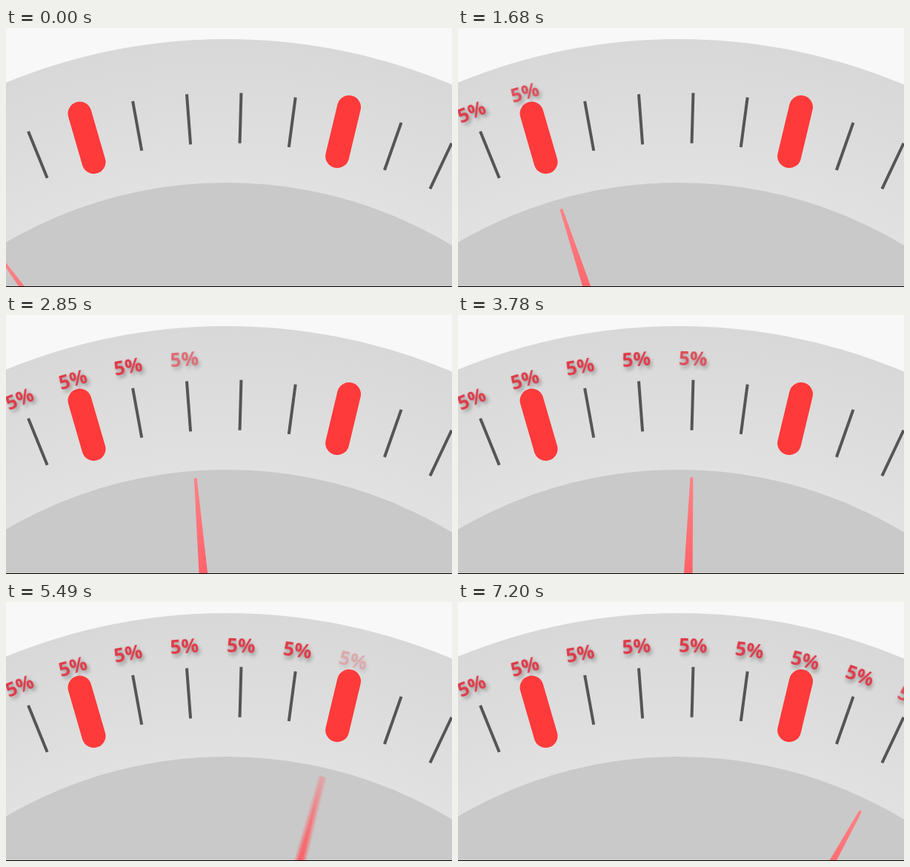
These frames come from a looping animation (602 px wide and 350 px high, 7590 ms). An HTML page with a canvas:

```html
<!DOCTYPE html>
<html lang="en">
<head>
<meta charset="utf-8">
<title>Dial</title>
<style>
  html, body { margin: 0; width: 100%; height: 100%; overflow: hidden; background: #f8f8f8; }
  svg, canvas { position: absolute; left: 0; top: 0; width: 602px; height: 350px; }
  text {
    font: 700 26px "Open Sans", "Noto Sans", sans-serif;
    text-anchor: middle;
    fill: #de3a48;
    filter: drop-shadow(2px 4px 2.5px rgba(0, 0, 0, .3));
  }
</style>
</head>
<body>
<svg viewBox="0 0 602 350">
  <defs>
    <radialGradient id="ring" gradientUnits="userSpaceOnUse" cx="297.5" cy="798" r="783">
      <stop offset=".75" stop-color="#e1e1e1"/>
      <stop offset="1" stop-color="#d8d8d8"/>
    </radialGradient>
  </defs>
  <circle cx="297.5" cy="798" r="783" fill="url(#ring)"/>
  <circle cx="297.5" cy="798" r="589" fill="#c9c9c9"/>
  <g id="marks"></g>
</svg>
<canvas id="needle" width="602" height="350"></canvas>
<svg viewBox="0 0 602 350"><rect y="349" width="602" height="1"/></svg>
<script>
const LOOP = 7590, STEP = 30;
const CX = 297.5, CY = 798;          // dial centre
const PIVOT_Y = 727, REACH = 508;    // needle
const STARTS = [-30, 810, 1680, 2640, 3540, 4470, 5340, 6060, 6900];

const clamp = v => Math.min(1, Math.max(0, v));
const ease = u => u < .5 ? 4 * u ** 3 : 1 - 4 * (1 - u) ** 3;

function add(parent, tag, attrs) {
  const el = document.createElementNS('http://www.w3.org/2000/svg', tag);
  for (const key in attrs) el.setAttribute(key, attrs[key]);
  return parent.appendChild(el);
}

const marks = document.getElementById('marks');
const labels = STARTS.map((_, i) => {
  const angle = 1.61 + 5.93 * (i - 4);
  const g = add(marks, 'g', { transform: `rotate(${angle} ${CX} ${CY})` });
  if (i === 1 || i === 6) {
    add(g, 'rect', { x: CX - 16, y: CY - 726.5, width: 32, height: 100, rx: 16, fill: '#ff3a3a' });
  } else {
    add(g, 'rect', { x: CX - 2, y: CY - 710.5, width: 4, height: 68, fill: '#555' });
  }
  const label = add(g, 'text', { x: CX - 1, y: CY - 730.5 });
  label.textContent = '5%';
  return label;
});

const ctx = document.getElementById('needle').getContext('2d');
const red = ctx.createLinearGradient(0, -REACH, 0, -370);
red.addColorStop(0, '#ff8286');
red.addColorStop(1, '#ff6067');

function angleAt(t) {
  let angle = -36.2;
  STARTS.forEach((start, i) => {
    const u = i ? (t - start) / 210 : (t - 30) / 150;
    angle += (i ? 6.73 : 11.3) * ease(clamp(u));
  });
  return angle;
}

function drawNeedle(angle, alpha) {
  ctx.save();
  ctx.translate(CX, PIVOT_Y);
  ctx.rotate(angle * Math.PI / 180);
  ctx.globalAlpha = alpha;
  ctx.beginPath();
  ctx.moveTo(-1.9, -REACH);
  ctx.lineTo(1.9, -REACH);
  ctx.lineTo(7, -340);
  ctx.lineTo(-7, -340);
  ctx.fillStyle = red;
  ctx.fill();
  ctx.restore();
}

function render(t) {
  labels.forEach((label, i) => {
    const shown = clamp((t - STARTS[i] - 100) / 140);
    const settled = i < 8 ? clamp((t - STARTS[i + 1]) / 60) : 0;
    label.style.opacity = .87 * shown + .13 * settled;
  });

  // Average the needle over the shutter time for motion blur
  ctx.clearRect(0, 0, 602, 350);
  ctx.globalCompositeOperation = 'lighter';
  const from = angleAt(t - 14), to = angleAt(t + 21);
  const n = to - from < .03 ? 1 : 24;
  for (let i = 0; i < n; i++) {
    drawNeedle(from + (to - from) * (i + .5) / n, 1 / n);
  }
}

const began = performance.now();
function tick() {
  const t = (performance.now() - began) % LOOP;
  render(Math.floor(t / STEP) * STEP);
  requestAnimationFrame(tick);
}
tick();
</script>
</body>
</html>
```
